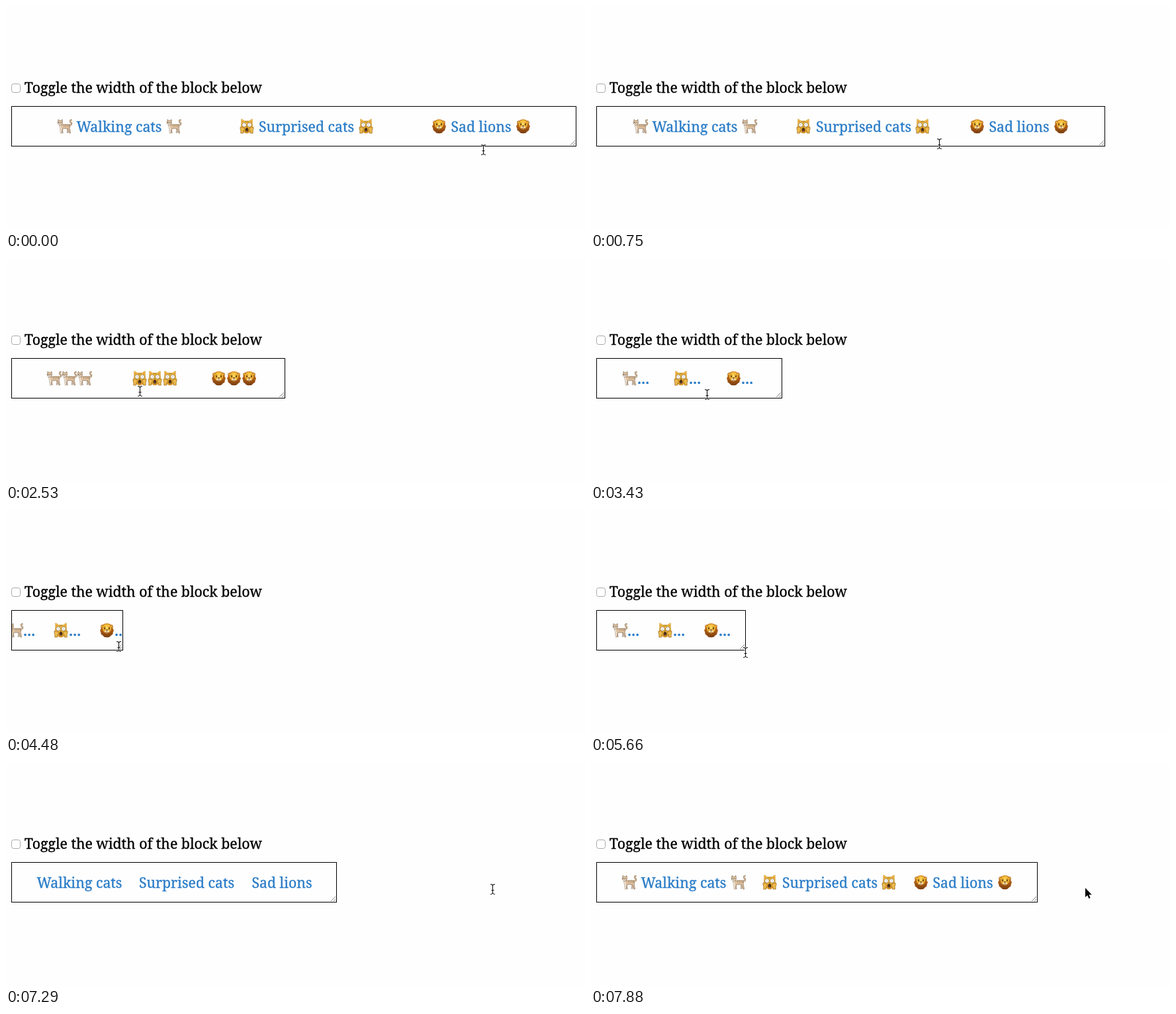
An HTML page for the animation above (8000 ms loop, 875 by 338 pixels).

```html
<!DOCTYPE html>
<html lang="en">
<head>
<meta charset="utf-8">
<title>Resizable block</title>
<style>
  html, body { margin: 0; width: 100%; height: 100%; overflow: hidden; background: #fefefe; }
  svg { display: block; width: 875px; height: 338px; }
  text { font-family: "Noto Serif", serif; font-size: 21.3px; stroke-width: .35px; }
  .title { stroke: #000; }
  .item { fill: #2a7cc7; }
  .item text { text-anchor: middle; stroke: #2a7cc7; }
  .item .dots { text-anchor: start; font-size: 20px; font-weight: 700; }
</style>
</head>
<body>
<svg viewBox="0 0 875 338">
  <defs>
    <linearGradient id="fur" x2="0" y2="1">
      <stop stop-color="#fbcb45"/><stop offset="1" stop-color="#dd9a25"/>
    </linearGradient>
    <linearGradient id="mane" x2="0" y2="1">
      <stop stop-color="#d98a22"/><stop offset=".55" stop-color="#a85a16"/><stop offset="1" stop-color="#7a3d10"/>
    </linearGradient>
    <clipPath id="inside"><rect id="clip" x="9" y="152" height="59"/></clipPath>

    <g id="cat" stroke-linejoin="round" stroke-linecap="round">
      <g fill="none">
        <path d="M18.5 9.5C22.4 10.4 23 7.6 21 5.6C19.4 4 19.6 2.2 21.6 2" stroke="#7d6245" stroke-width="2.2"/>
        <path d="M18.5 9.5C22.4 10.4 23 7.6 21 5.6C19.4 4 19.6 2.2 21.6 2" stroke="#dfc3a0" stroke-width="1.2"/>
      </g>
      <path d="M7.4 14L9.4 21.4H7.9L6 15M16 14L15.2 21.2H16.8L18 15" fill="#e6d8c8" stroke="#86705a" stroke-width=".6"/>
      <path d="M3.8 8L8 9C12 8.7 15 8.6 18.4 9C20 10.6 20 13 19.2 14.6L20.6 21.8H18.8L16.6 15.2C13 14.8 11 14.8 8.6 15.2L7 22H5.3L5 15C4 13 3.6 11 3.8 8Z" fill="#dcc0a0" stroke="#7b6147" stroke-width=".6"/>
      <path d="M4.9 10.2C4.8 13 5.6 14.6 6.3 15L6 21.4" fill="none" stroke="#f8f1e8" stroke-width="1.3"/>
      <path d="M10.5 9.3L10.8 11.6M13 9.2L13.4 11.8M15.5 9.2L16 11.6M17.8 10L18.1 12.4" stroke="#a58059" stroke-width=".8"/>
      <path d="M1.4 6L2 1.2L4 3H6L8 1.2L8.4 6C8.4 8.5 6.8 9.6 4.8 9.6S1 8.4 1.4 6Z" fill="#dfc4a2" stroke="#755c43" stroke-width=".6"/>
      <ellipse cx="4.2" cy="7.8" rx="2.2" ry="1.4" fill="#fcf7f0"/>
      <path d="M3 5.8V6.2M6 5.8V6.2M4.1 7.3H4.4" stroke="#33281e" stroke-width="1"/>
    </g>

    <g id="scream">
      <path d="M2.6 9L2.7 .8Q3.4 .2 7.6 3.6H14.4Q18.6 .2 19.3 .8L19.4 9Q20.5 12 19 16Q16 22 11 22T3 16Q1.5 12 2.6 9Z" fill="url(#fur)" stroke="#b97c1b" stroke-width=".5"/>
      <path d="M3.8 2.5L4.1 6L6.4 4.4ZM18.2 2.5L17.9 6L15.6 4.4Z" fill="#d98c4b"/>
      <path d="M11 3.8V6M8.9 4V5.4M13.1 4V5.4" stroke="#7b531a" stroke-width=".8"/>
      <g fill="#fff" stroke="#80602f" stroke-width=".7">
        <circle cx="7" cy="9.3" r="3.2"/><circle cx="15" cy="9.3" r="3.2"/>
      </g>
      <path d="M6.6 9.3H7.4M14.6 9.3H15.4M10.3 12.6H11.7" stroke="#45331c" stroke-width="1"/>
      <ellipse cx="11" cy="17" rx="2.3" ry="3.2" fill="#4a3018"/>
      <ellipse cx="11" cy="19" rx="1.4" ry=".9" fill="#a0624a"/>
      <path d="M1 13Q1.8 11.6 3.2 13.4L4.6 12.4Q5.8 12.2 6 13.8L7.4 15Q7.8 17 6 18.6L5.4 22H1.8Q2.4 18 1 15.2ZM21 13Q20.2 11.6 18.8 13.4L17.4 12.4Q16.2 12.2 16 13.8L14.6 15Q14.2 17 16 18.6L16.6 22H20.2Q19.6 18 21 15.2Z" fill="#edbb4c" stroke="#94621a" stroke-width=".7"/>
      <path d="M7.4 20.6L8.6 22.2H5.6ZM14.6 20.6L13.4 22.2H16.4Z" fill="#fefefe"/>
    </g>

    <g id="lion">
      <path d="M5 3.2Q11.5-1.2 18 3.2L20.4 6L20.6 9L22 11.5L20.8 14.5L20.3 17.5L17.5 19.5L15.3 21.8L11.5 22.3L7.7 21.8L5.5 19.5L2.7 17.5L2.2 14.5L1 11.5L2.4 9L2.6 6Z" fill="url(#mane)"/>
      <g fill="#eaa732" stroke="#8d5115" stroke-width=".6">
        <circle cx="4.5" cy="5.4" r="2"/><circle cx="18.5" cy="5.4" r="2"/>
      </g>
      <path d="M11.5 2.4C15.6 2.4 18 5 18 9C18 11.6 16.6 13.8 15 14.8Q11.5 16.6 8 14.8C6.4 13.8 5 11.6 5 9C5 5 7.4 2.4 11.5 2.4Z" fill="url(#fur)"/>
      <path d="M10.4 5.4L9.8 10.4H13.2L12.6 5.4Z" fill="#fbd768"/>
      <ellipse cx="11.5" cy="13.3" rx="3.5" ry="2.1" fill="#f6e2b0"/>
      <path d="M9.7 10.6H13.3L11.5 12.5Z" fill="#5b2a0d"/>
      <path d="M9.2 15Q11.5 12.8 13.8 15" fill="none" stroke="#713c16" stroke-width=".8"/>
      <path d="M8 8V9.2M15 8V9.2" stroke="#3c2410" stroke-width="1.6" stroke-linecap="round"/>
      <path d="M6.4 7L8.8 5.8M16.6 7L14.2 5.8" stroke="#a5641a" stroke-width=".7"/>
    </g>
  </defs>

  <rect width="875" height="338" fill="#fefefe"/>
  <rect x="8.5" y="117.5" width="13" height="13" rx="3" fill="#fff" stroke="#a8a8a8"/>
  <text class="title" x="27.7" y="131">Toggle the width of the block below</text>
  <rect id="frame" x="8.5" y="151.5" height="60" fill="none" stroke="#000"/>
  <g id="items" clip-path="url(#inside)"></g>
  <path id="grip" d="M-9 210L-2 203M-5 210L-2 207" stroke="#777" stroke-width=".9"/>
  <g id="beam" fill="none">
    <path id="stem" d="M-3-7.5Q.1-7.5 .5-5.5Q.9-7.5 4-7.5M-3 7.5Q.1 7.5 .5 5.5Q.9 7.5 4 7.5M.5-5.5V5.5M-1.5 1.5H2.5" stroke="#fff" stroke-width="2.4"/>
    <use href="#stem" style="display:none"/>
    <path d="M-3-7.5Q.1-7.5 .5-5.5Q.9-7.5 4-7.5M-3 7.5Q.1 7.5 .5 5.5Q.9 7.5 4 7.5M.5-5.5V5.5M-1.5 1.5H2.5" stroke="#111" stroke-width="1.1"/>
  </g>
  <path id="arrow" d="M0-8V6L3.2 3L5.4 8L7.6 7L5.5 2.2H9.8Z" stroke="#fff" stroke-width="1.1" paint-order="stroke"/>
</svg>

<script>
const LOOP = 8000, TICKS = 54;
const PAD = 24, EMOJI = 23, SPACE = 6, INSET = 14, DOTS = 18;
const MIN_ITEM = 2 * INSET + EMOJI + DOTS;
const FULL_FROM = 667, TEXT_FROM = 497;

// [tick, right edge of the block]
const edgeKeys = [[0, 862], [5, 777], [8, 678], [10, 645], [15, 461], [17, 422], [23, 289],
  [28, 186], [30, 177], [31, 223], [35, 268], [39, 223], [41, 223], [42, 195], [43, 178],
  [44, 196], [45, 230], [49, 500], [51, 610], [53, 675]];
// [tick, x, y]
const mouseKeys = [[0, 721, 217], [5, 526, 208], [10, 354, 201], [14, 225, 212], [15, 215, 218],
  [17, 202, 201], [23, 175, 206], [27, 165, 221], [30, 170, 206], [31, 215, 214], [35, 265, 231],
  [39, 222, 209], [41, 222, 209], [43, 190, 205], [44, 330, 190], [45, 499, 179], [46, 600, 182],
  [49, 735, 192], [53, 747, 198]];

const data = [
  { emoji: "cat", label: "Walking cats", size: 130, grow: 57 / 158 },
  { emoji: "scream", label: "Surprised cats", size: 145, grow: 65 / 158 },
  { emoji: "lion", label: "Sad lions", size: 92, grow: 36 / 158 },
];

const $ = id => document.getElementById(id);
const set = (node, attrs) => { for (const k in attrs) node.setAttribute(k, attrs[k]); };

function add(parent, tag, attrs, text = "") {
  const node = document.createElementNS("http://www.w3.org/2000/svg", tag);
  set(node, attrs);
  node.textContent = text;
  return parent.appendChild(node);
}

const items = data.map(d => {
  const g = add($("items"), "g", { class: "item" });
  return {
    ...d,
    icons: [0, 1, 2].map(() => add(g, "use", { href: "#" + d.emoji, y: 170 })),
    text: add(g, "text", { y: 190 }, d.label),
    dots: add(g, "text", { y: 190, class: "dots" }, "…"),
  };
});

function track(keys, tick, i = 1) {
  const n = Math.max(1, keys.findIndex(k => k[0] >= tick));
  const a = keys[n - 1], b = keys[n];
  return a[i] + (b[i] - a[i]) * (tick - a[0]) / (b[0] - a[0]);
}

// Places a node, or hides it when x is undefined.
function place(node, x) {
  node.style.display = x === undefined ? "none" : "";
  if (x !== undefined) node.setAttribute("x", Math.round(x));
}

function show(item, iconXs, textX, dotsX) {
  item.icons.forEach((icon, i) => place(icon, iconXs[i]));
  place(item.text, textX);
  place(item.dots, dotsX);
}

function layoutLabels(room, withIcons) {
  const side = withIcons ? EMOJI + SPACE : 0;
  const width = item => item.size + 2 * side;
  const gap = (room - items.reduce((sum, item) => sum + width(item), 0)) / 6;
  let x = 9 + PAD + gap;
  for (const item of items) {
    const w = width(item);
    show(item, withIcons ? [x, x + w - EMOJI] : [], x + w / 2);
    x += w + 2 * gap;
  }
}

function layoutIcons(room) {
  const spare = room - 3 * MIN_ITEM;
  let x = 9 + PAD + Math.min(0, spare / 2);
  for (const item of items) {
    const w = MIN_ITEM + Math.max(0, spare) * item.grow;
    const fit = w - 2 * INSET;
    const cut = fit < 3 * EMOJI;
    const count = !cut ? 3 : fit >= 2 * EMOJI + DOTS ? 2 : 1;
    const left = cut ? x + INSET : x + (w - 3 * EMOJI) / 2;
    const xs = Array.from({ length: count }, (_, i) => left + i * EMOJI);
    show(item, xs, undefined, cut ? left + count * EMOJI : undefined);
    x += w;
  }
}

function draw(time) {
  const tick = Math.min(TICKS - 1, Math.floor(time % LOOP / LOOP * TICKS));
  const edge = Math.round(track(edgeKeys, tick));
  const room = edge - 10 - 2 * PAD;

  set($("frame"), { width: edge - 9 });
  set($("clip"), { width: edge - 10 });
  set($("grip"), { transform: `translate(${edge})` });
  if (edge >= TEXT_FROM) layoutLabels(room, edge >= FULL_FROM);
  else layoutIcons(room);

  const x = Math.round(track(mouseKeys, tick)), y = Math.round(track(mouseKeys, tick, 2));
  const pointing = tick >= 51;
  for (const id of ["beam", "arrow"]) {
    set($(id), { transform: `translate(${x} ${y})` });
    $(id).style.display = (id === "arrow") === pointing ? "" : "none";
  }
}

const start = performance.now();
function loop() {
  draw(performance.now() - start);
  requestAnimationFrame(loop);
}
loop();
</script>
</body>
</html>
```
